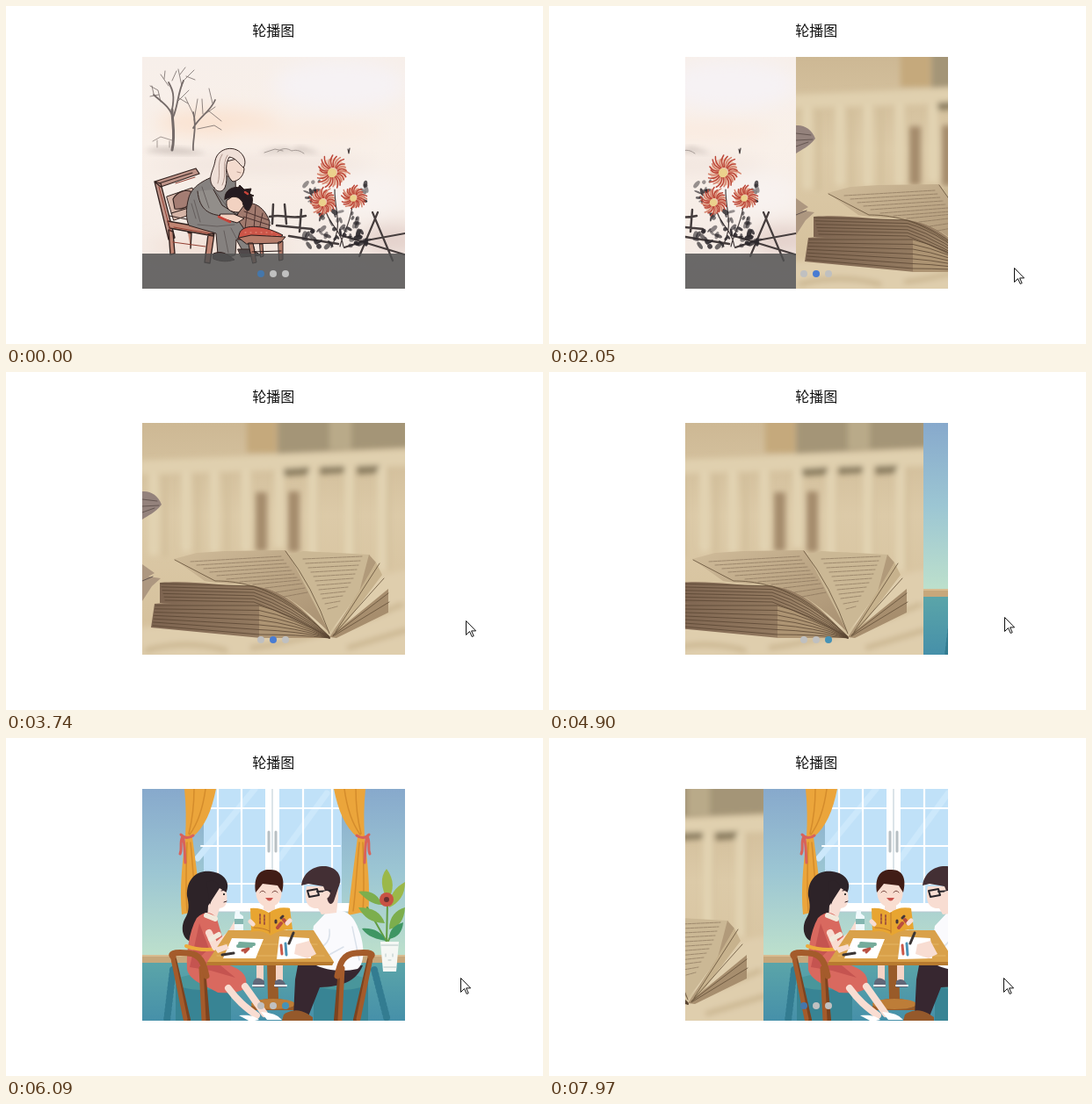
An HTML page for the animation above (8000 ms loop, 611x385 px).

```html
<!DOCTYPE html>
<html lang="zh">
<head>
<meta charset="utf-8">
<title>轮播图</title>
<style>
html, body { margin: 0; width: 100%; height: 100%; overflow: hidden; background: #fff; }
body > svg { display: block; width: 100%; height: 100%; }
.title { font: 16px "Noto Sans CJK SC", "Noto Sans CJK", sans-serif; fill: #111; }
.line { fill: none; stroke-linecap: round; stroke-linejoin: round; }
#track, #cursor, .dot { animation: 8s step-end -4ms infinite; }
#track { animation-name: slide; }
#cursor { animation-name: point; }
.dot { fill: #c0c0c0; }
#d1 { animation-name: first; }
#d2 { animation-name: second; }
#d3 { animation-name: third; }

@keyframes slide {
  0% { transform: none; }
  23.625% { transform: translateX(-3px); }
  24.625% { transform: translateX(-75px); }
  25.625% { transform: translateX(-173px); }
  26.625% { transform: translateX(-240px); }
  27.625% { transform: translateX(-275px); }
  28.5% { transform: translateX(-292px); }
  29.5% { transform: translateX(-299px); }
  61.25% { transform: translateX(-327px); }
  62.5% { transform: translateX(-439px); }
  63.5% { transform: translateX(-511px); }
  64.5% { transform: translateX(-555px); }
  65.5% { transform: translateX(-580px); }
  66.5% { transform: translateX(-593px); }
  67.375% { transform: translateX(-598px); }
  98.375% { transform: translateX(-594px); }
  99.625%, 100% { transform: translateX(-509px); }
}
@keyframes point {
  0% { transform: translate(640px, 400px); }
  8.25% { transform: translate(549px, 361px); }
  9.2% { transform: translate(546px, 348px); }
  10.1% { transform: translate(539px, 329px); }
  11.1% { transform: translate(531px, 311px); }
  12.1% { transform: translate(525px, 299px); }
  13.1% { transform: translate(524px, 294px); }
  14% { transform: translate(530px, 295px); }
  15% { transform: translate(538px, 300px); }
  16.875% { transform: translate(533px, 299px); }
  17.875% { transform: translate(529px, 298px); }
  27.625% { transform: translate(533px, 296px); }
  28.5% { transform: translate(538px, 293px); }
  29.5% { transform: translate(537px, 288px); }
  30.375% { transform: translate(531px, 285px); }
  31.375% { transform: translate(526px, 283px); }
  32.375% { transform: translate(524px, 283px); }
  46.75% { transform: translate(523px, 283px); }
  49.625% { transform: translate(520px, 281px); }
  50.625% { transform: translate(518px, 279px); }
  74.25% { transform: translate(518px, 275px); }
  76.125%, 100% { transform: translate(517px, 273px); }
}
@keyframes first { 0%, 98.375%, 100% { fill: #4577ab; } 23.625% { fill: #c0c0c0; } }
@keyframes second { 23.625% { fill: #497cd2; } 61.25% { fill: #c0c0c0; } }
@keyframes third { 61.25% { fill: #4692b5; } 98.375% { fill: #c0c0c0; } }
</style>
</head>
<body>
<svg viewBox="0 0 611 385">
<defs>
  <clipPath id="frame"><path d="M155 58h299v264H155z"/></clipPath>
  <filter id="soft" x="-30%" y="-30%" width="160%" height="160%"><feGaussianBlur stdDeviation="3"/></filter>
  <filter id="mist" x="-50%" y="-50%" width="200%" height="200%"><feGaussianBlur stdDeviation="10"/></filter>
  <linearGradient id="paper" x2="0" y2="1">
    <stop stop-color="#f7efea"/><stop offset=".4" stop-color="#f9f0e9"/><stop offset="1" stop-color="#f3e9e3"/>
  </linearGradient>
  <linearGradient id="room" x2="0" y2="1">
    <stop stop-color="#cdb894"/><stop offset=".4" stop-color="#dccaa8"/><stop offset="1" stop-color="#d4bf9a"/>
  </linearGradient>
  <linearGradient id="leaf" x2="1" y2="1">
    <stop stop-color="#d0bc9a"/><stop offset="1" stop-color="#a78f70"/>
  </linearGradient>
  <linearGradient id="stack">
    <stop stop-color="#7d6450"/><stop offset=".6" stop-color="#937a60"/><stop offset="1" stop-color="#ac9474"/>
  </linearGradient>
  <linearGradient id="wall" x2="0" y2="1">
    <stop stop-color="#87a9cc"/><stop offset=".5" stop-color="#9cc6d3"/><stop offset="1" stop-color="#bde0cc"/>
  </linearGradient>
  <linearGradient id="floor" x2="0" y2="1">
    <stop stop-color="#5ba5a9"/><stop offset="1" stop-color="#4690a9"/>
  </linearGradient>
  <g id="curtain">
    <path fill="#eba53b" d="M203 58h36c-5 25-13 44-27 55 4 30 8 60 11 89l-14-3-9 2c-3-30 1-61 4-88 1-18 1-36-1-55z"/>
    <path class="line" stroke="#d48c2c" stroke-width="1.5" d="M214 58c0 24-3 39-6 51M227 58c-3 22-10 41-18 52M206 119c-1 27-2 53 0 78M210 119c3 30 4 56 7 78"/>
    <path class="line" stroke="#d8625b" stroke-width="3" d="M199 110c4 5 10 4 14 1M201 112c-4 8 0 14-3 20M201 112c3 9 2 20 3 30"/>
  </g>
  <g id="chair" class="line">
    <path stroke="#7d431f" stroke-width="6" d="M191 252l16 69M224 263l5 58"/>
    <path stroke="#a45b2b" stroke-width="5" d="M190 251l14 69M222 262l3 59"/>
    <path stroke="#a45b2b" stroke-width="7" d="M190 249c-5-5 8-5 17-4 15 1 18 12 21 26"/>
  </g>
</defs>

<text class="title" x="304.3" y="34" text-anchor="middle">轮播图</text>

<g clip-path="url(#frame)"><g id="track">

<svg x="155" y="58" width="299" height="264" viewBox="155 58 299 264">
  <path fill="url(#paper)" d="M155 58h299v264H155z"/>
  <g filter="url(#mist)">
    <ellipse cx="240" cy="133" rx="70" ry="15" fill="#fae2d0"/>
    <ellipse cx="380" cy="90" rx="75" ry="28" fill="#f6f2f4"/>
    <ellipse cx="340" cy="142" rx="90" ry="8" fill="#fae9dd"/>
    <ellipse cx="290" cy="181" rx="130" ry="8" fill="#efe2db"/>
    <ellipse cx="410" cy="215" rx="50" ry="26" fill="#f8f2ef"/>
    <ellipse cx="440" cy="266" rx="36" ry="16" fill="#e3d0ca"/>
    <ellipse cx="245" cy="274" rx="80" ry="10" fill="#f1ddd2"/>
  </g>
  <g fill="#b6a9a3" opacity=".55">
    <path d="M287 168c8-2 12-6 19-5 8-3 14-1 19 1 6-4 10-5 16-2 7 1 11 4 17 7-24-4-46-2-71-1z" filter="url(#soft)"/>
    <path d="M157 165q28-10 72 3-40 3-72-3z" filter="url(#soft)"/>
  </g>
  <path class="line" stroke="#a59a95" d="M167 154l9-5 13 4M172 153v8M186 154v7M294 167l12-4 9 2M309 166c6-5 11-4 16-1 7-2 11 1 14 3"/>
  <g class="line" stroke="#756b69">
    <path stroke-width="3" d="M189 164c4-18 0-31 0-46"/>
    <path stroke-width="1.8" d="M190 128c-3-14-15-20-22-27M189 118c3-16 1-22-4-31M190 127c6-14 5-27 12-42M213 164c-1-13 5-25 0-43M213 139c8-14 19-18 25-32"/>
    <path stroke-width=".8" d="M176 109l-3-13-9-5M185 91l-9-13M200 91l-4-19M202 85l12-12M205 80l10 4M196 108l12-12M213 123l-9-19M207 111l-10-6M214 130l4-24M224 123l-1-17M230 119l15 12M235 111l-4-17M218 140l19-4 8 5M174 101l-10 2M189 85l5-11M180 83l1-9M198 78l6-8M168 100l-2-9M228 122l10-7"/>
  </g>

  <g class="line" stroke="#32221f">
    <path fill="#bf9488" stroke-width="1.3" d="M169 200l47-15 4 6-44 15zM169 200l7 2 16 62-7 2z"/>
    <path fill="#d6b5a7" stroke-width="1" d="M183 217l29-10 6 28-27 9z"/>
    <path fill="#a47d73" stroke-width="1.2" d="M190 220c5-9 14-11 20-9l3 12c-7 7-14 9-21 8z"/>
    <path stroke-width="1.2" d="M174 202l38-12M188 236l23-7M186 239l49 10"/>
    <path fill="#c08573" stroke-width="1.4" d="M184 245l51 9 1 8-50-9zM185 255l5 2 2 25-5 1zM230 260l7-1-5 34-6-1zM207 258l4 1-1 17"/>
    <path stroke="#923e31" d="M174 206l13 50M193 202l22-7M191 252l40 7M190 269l37 5"/>
    <path fill="#85817f" d="M239 193c-19 7-28 15-31 25-4 14-3 25 0 32l31 9 2 24c9 5 18 2 20 0l1-17 9 16 12-4-8-28-13-16-1-39z"/>
    <path fill="#928e8a" d="M218 211c2 22 14 27 29 28l12 7 7-6-20-13-10-18"/>
    <path stroke="#5c5553" stroke-width=".8" d="M211 225l5 17M214 221l7 25M223 206l8 24M238 211l14 18M218 249l22 2 20-2M248 256l5 25M256 253l12 23"/>
    <path fill="#50494a" d="M236 282c9-4 15 0 24 7-9 3-17 2-24-1zM264 277l16 0 10 7-22 2z"/>
    <path fill="#f4dbce" d="M249 178c2 9 3 17 9 22 7-1 12-6 13-14l-3-13z"/>
    <path fill="#efdfd7" d="M237 207c-10-9 0-21 1-31 3-15 24-19 32-5 3 5 2 11 0 13-5-4-8-11-16-12-7 12 0 23-5 35-3 6-10 5-12 0z"/>
    <path stroke="#9d8177" stroke-width=".8" d="M246 169c-7 12-1 20-5 33M252 170c-7 11 0 22-6 34M263 189l4 1"/>
  </g>
  <g class="line" stroke="#2a1d1c">
    <path fill="#a17a6e" d="M270 226c12-5 25 4 30 20l-1 10-26 1-11-16z"/>
    <path stroke="#4b312e" d="M271 234l28 10M270 240l31 10M275 227l-3 27M284 228l-2 26M292 236l-4 20"/>
    <path fill="#cc5548" d="M266 258c3-8 22-11 49 3l-5 4-46 1z"/>
    <path stroke="#e99787" stroke-dasharray="1 5" d="M272 258h36M278 262h31"/>
    <path fill="#f2d2c1" d="M251 222c-1 9 3 13 14 13l8-11-8-12zM244 237l15 0 12 5-8 5-20-6z"/>
    <path fill="#251b20" d="M249 220c-1-13 16-18 24-9 11 4 8 15 3 22-4 0-6-5-7-10-5-7-10-7-20-3zM263 209l3-5 5 5 8-1-2 6 5 2-8 2"/>
    <path stroke="#c64339" stroke-width="2.5" d="M272 212l3 2M242 240l13 6"/>
    <path fill="#b57c6a" d="M265 264l14-3 39 2-6 7-38 1zM276 270h5l4 22-4 1zM310 269l5-1 0 21-4 1zM289 271h3l1 14-3 1zM280 280l33-1"/>
  </g>

  <g class="line" stroke="#453d3d">
    <path stroke-width="2.5" d="M304 226l-1 22M317 226l2 22M336 232l-2 25M300 240c15-4 23 4 41-1M308 250l40 4M322 262l56 9"/>
    <path stroke-width="1.2" d="M374 209c0 27 10 39-4 66M363 231c5 20 17 21 21 43M394 228c-3 23-10 28-14 46M389 163l1 5 1-6"/>
    <path stroke-width="2.2" d="M402 285l21-50M417 235l23 55M380 261l24 7 49 15M385 275l25-8 44-8"/>
  </g>
  <g id="leaves" fill="#2c282c"></g>
  <g id="blooms"></g>
  <path fill="#505050" fill-opacity=".84" d="M155 282h299v40H155z"/>
</svg>

<svg x="454" y="58" width="299" height="264" viewBox="155 58 299 264">
  <path fill="url(#room)" d="M155 58h299v264H155z"/>
  <g filter="url(#soft)">
    <path fill="#c5a97b" d="M274 50h34v42h-34z"/>
    <path fill="#a49577" d="M309 50h150v36l-150 7z"/>
    <path fill="#b9aa89" d="M368 50h25v38h-25z"/>
    <path fill="#e0d0af" d="M150 101l309-13v19l-309 10z"/>
    <path fill="#8d7f62" d="M316 110l29-2v9l-29 2zM357 108l28-1v8l-28 2zM399 107l27-1v9l-27 2z"/>
    <path class="line" stroke="#d0bd99" stroke-width="4" d="M181 120v89M218 118v89M252 117v89M310 116v90M354 114v94M397 113v106M435 110v113"/>
    <path class="line" stroke="#e2d3b2" stroke-width="11" d="M168 120v84M205 118v82M237 117v84M273 116v84M311 116v80M349 116v90M391 114v105M428 112v110"/>
    <path fill="#a48b6c" d="M284 137h13v67h-13zM321 136h13v69h-13z"/>
    <path fill="#dfcead" d="M150 291c75-6 115-10 183-11 28-19 67-47 126-55v104H150z"/>
    <path class="line" stroke="#c8b38d" stroke-width="5" d="M280 314q80-10 170-49M390 314l65-20M160 317q45-13 90 0"/>
  </g>
  <path fill="#94827c" d="M155 136c9-1 18 4 22 15-8 10-15 12-22 17z"/>
  <path fill="#ad9780" d="M155 219l14 10-7 4 14 2-10 9-11 17z"/>
  <path class="line" stroke="#655651" d="M155 145l17 2M155 153l19-1M155 160l14-5M155 238l12-5"/>

  <path fill="url(#stack)" d="M169 264c50-3 80 1 119 0 34 2 53 21 80 39h-78l-125-12z"/>
  <path fill="#ad9473" d="M288 266c32 4 53 21 80 37h-80z"/>
  <path fill="url(#stack)" d="M175 240c45-3 70 5 105 3 34 3 60 28 88 59l-75-36-118-3z"/>
  <path fill="url(#leaf)" d="M191 213l26-7 32-2 69-1c17 23 33 55 50 94-18-18-38-36-62-47-26-10-57-8-80-12z"/>
  <path fill="#cbb895" d="M322 208l16-4 76 4-12 43-34 46z"/>
  <path fill="#b19a7a" d="M413 208l8 9-45 81-8 4 34-52z"/>
  <path fill="#c7b28d" d="M421 217l7 14-42 56-14 13z"/>
  <path fill="#a78e6e" d="M435 247v27l-59 29-8-1z"/>
  <g id="pages" class="line" stroke="#574331" stroke-opacity=".75"></g>
  <path class="line" stroke="#655139" stroke-opacity=".8" d="M192 214l46 24c35 0 72 9 130 63M318 204q31 40 50 94M425 218l-50 78M430 235l-57 64M435 252l-63 48M436 262l-64 39"/>
  <g class="line" stroke="#806c54" stroke-dasharray="4 1" opacity=".6">
    <path d="M210 216l103-6M217 220l99-6M225 224l94-6M232 228l90-6M240 232l85-6M251 236l77-6M266 239l65-5M281 242l53-5M295 246l42-5M307 251l33-5M316 256l27-5M338 213l67-3M341 218l62-3M344 223l57-3M347 228l52-3M350 233l47-3M352 238l43-3M354 243l38-3M356 248l33-3M358 253l28-3M360 258l23-3M363 264l17-3M366 270l11-3"/>
  </g>
</svg>

<svg x="753" y="58" width="299" height="264" viewBox="155 58 299 264">
  <path fill="url(#wall)" d="M155 58h299v190H155z"/>
  <path fill="url(#floor)" d="M155 255h299v67H155z"/>
  <path fill="#c7a77b" d="M155 247h299v9H155z"/>
  <path fill="#d8bc91" d="M155 247h299v2H155z"/>
  <path class="line" stroke="#337c91" stroke-width="8" stroke-dasharray="1 4" stroke-linecap="butt" d="M190 264l-7 58M419 264l15 58"/>
  <path fill="#c0e1f8" d="M225 58h157v134H225z"/>
  <path class="line" stroke="#cce8fb" stroke-width="7" d="M218 137l65-79M311 137l54-74"/>
  <path class="line" stroke="#fff" stroke-width="2.2" d="M241 58v134M268 58v134M338 58v134M371 58v134M222 80h158M222 123h158M222 166h158"/>
  <path fill="#fff" d="M295 58h16v136h-16zM214 188h182v10H214z"/>
  <path class="line" stroke="#b8c9d2" d="M303 58v132M214 198h182"/>
  <path class="line" stroke="#b8c0c4" stroke-width="3" d="M299 107v22M307 107v22"/>
  <use href="#curtain"/><use href="#curtain" transform="matrix(-1 0 0 1 612 0)"/>

  <g class="line" stroke="#619c42" stroke-width="2"><path d="M433 233l1-45M433 232l-22-39M435 231l13-28"/></g>
  <path fill="#9bb849" d="M434 185c-7-15-9-26-1-36 9 12 9 25 1 36zM436 193c0-14 7-23 18-29 0 15-7 24-18 29z"/>
  <path fill="#7cae4d" d="M428 190c-12 0-19-7-27-15 14-2 23 4 27 15zM431 211c-16-1-23-6-30-18 17 0 26 6 30 18zM436 218c0-15 8-22 18-25-1 15-7 22-18 25z"/>
  <path fill="#3f9663" d="M432 231c-17-3-23-8-27-14 13-1 23 4 27 14zM436 229c0-12 7-16 16-19-1 11-6 17-16 19z"/>
  <circle cx="433" cy="184" r="8" fill="#c85343"/><circle cx="433" cy="184" r="3" fill="#69312f"/>
  <path fill="#f5f7f4" d="M426 232h21l-3 34h-15z"/>
  <path class="line" stroke="#b5c6c6" d="M427 236h19M430 261h14M432 246v3M440 246v3M435 253h3"/>

  <path fill="#388494" d="M193 278h63v44h-63zM350 278h62v44h-62z"/>
  <g fill="#49969b"><ellipse cx="224" cy="278" rx="32" ry="9"/><ellipse cx="381" cy="278" rx="31" ry="9"/></g>
  <path fill="#995b29" d="M297 256h12l1 41c13 2 19 6 22 13h-56c4-8 11-12 22-13z"/>
  <ellipse cx="304" cy="303" rx="25" ry="6" fill="#bd7d38"/>
  <path fill="#f5d4c6" d="M285 257h8v20h-8zM307 257h8v20h-8z"/>
  <path fill="#616879" d="M281 279c2-8 9-6 13-2v7h-13zM306 277c6-4 11-2 13 7h-13z"/>
  <path class="line" stroke="#fff" stroke-width="2" d="M281 282h12M306 282h13"/>

  <path fill="#f7f9fb" d="M282 198q17-9 35 0l4 25h-41z"/>
  <path fill="#f9ddd0" d="M293 186h13v9q-7 5-13 0zM285 169q15-8 28 0c3 16-5 24-14 23-9 1-17-8-14-23z"/>
  <path fill="#411d16" d="M284 176c-3-20 6-27 17-26 13 0 17 11 13 26l-5-8-17-2z"/>
  <path class="line" stroke="#76483f" d="M289 176q3-4 6 0M303 176q3-4 6 0"/>
  <path fill="#c9534c" d="M295 182h9q-4 7-9 0z"/>

  <path fill="#2d2328" d="M206 180c-1-20 12-30 27-28 17 2 23 14 17 25l-10 14c0 29-14 44-26 42-14-2-16-18-10-28 5-8 4-16 2-25z"/>
  <path fill="#f8ddd3" d="M230 191l13-20 8 5c1 9 1 17-8 18l-3 10-11 2z"/>
  <path fill="#2d2328" d="M228 164c12-5 16 5 13 9-3 4-6 8-9 17z"/>
  <path class="line" stroke="#322329" d="M245 174l4-1M248 187l3-1"/><circle cx="248" cy="178" r="1"/>
  <path fill="#d9695f" d="M217 205c9-8 17-8 23 1l8 27-1 24c22 5 30 15 25 28-10 7-20 5-31 5-13-8-31-12-35-26-1-19 2-43 11-59z"/>
  <path fill="#c55450" d="M220 211l11 29-14 13 27 6 17 14-28-8-24-4z"/>
  <path class="line" stroke="#ecab3d" stroke-width="4" d="M205 237c14 5 28 5 42 2"/>
  <path class="line" stroke="#f9ddd2" stroke-width="8" d="M231 222l7 16 18-15 7-12M253 285c11 15 19 21 32 31M272 283l22 31"/>
  <path class="line" stroke="#f2e9db" stroke-width="6" d="M228 202l10 4M233 229l9-5"/>
  <path fill="#fff" d="M265 316c10-1 18 0 23 5l-10 2zM290 312q18 1 24 9h-17z"/>
  <path fill="#f0f9fc" d="M261 196h5v4l4 3v16h-10v-16z"/><path fill="#83b5b0" d="M260 206h10v6h-10z"/><path fill="#fff" d="M260 192h7v4h-7z"/>

  <path fill="#372730" d="M332 259h74c-8 19-24 24-49 25l-13 33h-17l2-42z"/>
  <path fill="#95592b" d="M316 315q15-11 33 3v4h-35z"/>
  <path fill="#fafafd" d="M365 198c21-6 31 3 38 25 5 16 5 34-3 40-17 4-38 1-47-4l-9-8-19-7 4-9 18 0 3-21z"/>
  <path class="line" stroke="#dae1ea" stroke-width="1.5" d="M368 218c2 16-9 25-25 20M362 250l22-12M394 215l8 38"/>
  <path fill="#f8ddd2" d="M342 169h36v13l-2 17-17 2-4-7c-14 1-16-12-13-25z"/>
  <path fill="#432f34" d="M336 168c2-15 14-23 28-22 14 2 20 13 14 25l-5 15c-4 7-8 0-8-7l-4-10-17-3z"/>
  <path class="line" stroke="#252329" stroke-width="2" d="M343 174l11-2 2 7-11 2zM354 175l15-1"/>
  <path fill="#f8ddd2" d="M361 175q6-3 8 2-3 9-8 4z"/>

  <path fill="#d9a14a" d="M253 219h97l23 36-2 4H228l1-4z"/>
  <path fill="#b87b30" d="M229 255h144l-2 4H228z"/>
  <path class="line" stroke="#e5b665" d="M240 248h122M248 235h106"/>
  <path fill="#fff" d="M257 228l36 1-9 22h-37zM311 226l34 2 2 23-39 1z"/>
  <path class="line" stroke="#75ab9b" stroke-width="4" d="M266 234l16 1M264 237h15"/>
  <path class="line" stroke="#ba5143" stroke-width="3" d="M269 242l7-2-4 4"/>
  <path class="line" stroke="#3a3535" stroke-width="3" d="M246 247l13-2M322 234l5-12"/>
  <path class="line" stroke="#cc594a" stroke-width="3" d="M313 236l1 10"/><path class="line" stroke="#4c93b6" stroke-width="3" d="M318 234l1 13"/>
  <path fill="#f8ddd2" d="M330 235l15-4 8 15-10 5-15-5zM237 239l14-4 3 5-13 5z"/>
  <path fill="#e8a531" d="M278 194q12-1 21 5 11-8 24-5l3 24q-15 0-25 7-10-7-22-4z"/>
  <path class="line" stroke="#be782b" d="M300 199v23M282 216q10 0 18 4"/>
  <path class="line" stroke="#a5583c" stroke-width="2" stroke-dasharray="2 2" d="M289 201v11M294 202v12"/>
  <path class="line" stroke="#b94c3e" stroke-width="4" d="M309 216l4-5M316 207l3 4"/>
  <path class="line" stroke="#453638" stroke-width="3" d="M313 205l2-2M307 210v-2"/>
  <path class="line" stroke="#f8ddd2" stroke-width="5" d="M278 209l3 3M323 208l-3 3"/>
  <use href="#chair"/><use href="#chair" transform="matrix(-1 0 0 1 605 0)"/>
</svg>

</g></g>

<circle class="dot" id="d1" cx="290" cy="305" r="4"/>
<circle class="dot" id="d2" cx="304" cy="305" r="4"/>
<circle class="dot" id="d3" cx="318" cy="305" r="4"/>
<path id="cursor" fill="#fff" stroke="#111" d="M.5.5v16l4-4 2.7 6 2-.9-2.6-5.7h5z"/>
</svg>
<script>
const ns = 'http://www.w3.org/2000/svg';
const byId = id => document.getElementById(id);
function add(parent, tag, attrs) {
  const el = document.createElementNS(ns, tag);
  for (const key in attrs) el.setAttribute(key, attrs[key]);
  parent.append(el);
}

let seed = 17;
const random = () => (seed = seed * 16807 % 2147483647) / 2147483647;

// Ink leaves: each band is a patch of brush dabs
function dabs(count, x, y, width, height) {
  for (let i = 0; i < count; i++) {
    const left = x + random() * width;
    const top = y + random() * height;
    add(byId('leaves'), 'ellipse', {
      rx: 2 + random() * 3.5, ry: 1 + random() * 1.8, opacity: .45 + random() * .5,
      transform: `translate(${left} ${top}) rotate(${random() * 180})`
    });
  }
}
dabs(14, 341, 197, 16, 26);
dabs(9, 400, 202, 10, 28);
dabs(24, 350, 234, 50, 22);
dabs(34, 332, 256, 80, 18);

function bloom(x, y, r) {
  const petals = 26;
  add(byId('blooms'), 'circle', { cx: x, cy: y, r: r * .82, fill: '#ecc8b5' });
  for (let i = 0; i < petals; i++) {
    const reach = r * (.75 + random() * .3);
    add(byId('blooms'), 'path', {
      class: 'line', stroke: i % 3 ? '#bd4637' : '#d4806a', 'stroke-width': 1.5,
      d: `M${r * .3} 0Q${reach * .7} -3 ${reach} 2`,
      transform: `translate(${x} ${y}) rotate(${i * 360 / petals})`
    });
  }
  add(byId('blooms'), 'circle', { cx: x - 1, cy: y + 1, r: r * .27, fill: '#ebd18c' });
}
bloom(372, 189, 19);
bloom(361, 223, 16);
bloom(396, 218, 14);

// Page edges that bend at the fold and meet at the spine
for (let i = 0; i < 7; i++) {
  add(byId('pages'), 'path', { d: `M${170 - i * .5} ${266 + i * 3.8}L288 ${266 + i * 5.5}Q${325 + i} ${275 + i * 4} 368 303` });
}
for (let i = 0; i < 6; i++) {
  add(byId('pages'), 'path', { d: `M${176 + i} ${241 + i * 3.8}L282 ${244 + i * 3.6}Q${325 - i} ${256 + i * 4} 368 302` });
}
</script>
</body>
</html>
```
